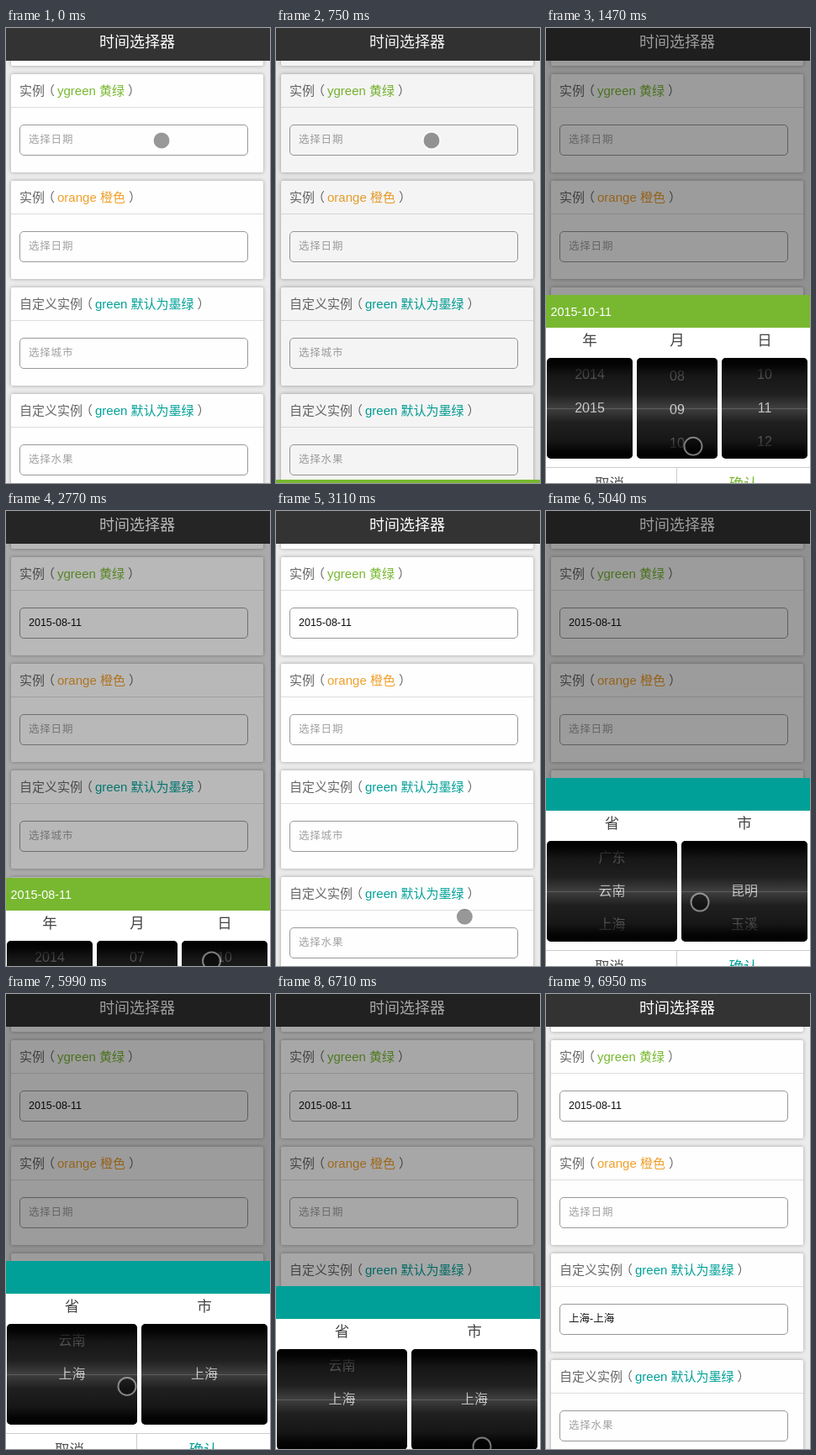
Animation, 314 px wide and 542 px high, one loop 7.55 s. Source, as an HTML page:

```html
<!DOCTYPE html>
<html lang="zh-CN">
<head>
<meta charset="utf-8">
<title>时间选择器</title>
<style>
* { box-sizing: border-box; }
html, body { margin: 0; width: 100%; height: 100%; overflow: hidden; }
body { font-family: "Liberation Sans", "Noto Sans CJK SC", "Noto Sans CJK", sans-serif; }
#stage { position: relative; width: 314px; height: 542px; overflow: hidden; background: #ebebeb; white-space: nowrap; }
#stage * { position: absolute; }
#stage span { position: relative; }
header { left: 0; top: 0; width: 314px; height: 39px; background: #333; color: #fff; font-size: 18px; line-height: 34px; text-align: center; padding-right: 2px; }
.card { left: 6px; width: 300px; height: 117px; background: #fefefe; border-radius: 2px; box-shadow: 0 0 4px rgba(0,0,0,.32); }
.card h2 { left: 0; top: 0; width: 100%; height: 40px; margin: 0; padding-left: 10px; border-bottom: 1px solid #ddd; font: inherit; font-size: 15px; line-height: 40px; color: #666; }
.card .open { left: -3px; }
.card .close { left: 4px; }
.field { left: 10px; top: 60px; width: 272px; height: 37px; padding-left: 10px; border: 1px solid #999; border-radius: 5px; font-size: 12.5px; line-height: 35px; color: #111; }
.field.hint { letter-spacing: .8px; color: #a2a2a2; }
#shade { inset: 0; background: #000; }
.panel { left: 0; top: 0; width: 314px; height: 244px; background: #fff; }
.bar { left: 0; top: 0; width: 100%; height: 39px; padding-left: 5.5px; background: var(--tint); color: #fff; font-size: 14.4px; line-height: 40px; }
.label { top: 36px; height: 36px; font-size: 17.5px; line-height: 36px; text-align: center; color: #444; }
.wheel { top: 75px; height: 120px; overflow: hidden; border-radius: 5px; background: #484848; }
.wheel .item { left: 0; top: 39.5px; width: 100%; height: 40px; font-size: 16px; line-height: 40px; text-align: center; color: #f8f8f8; }
.wheel .glass { inset: 0; background: linear-gradient(#000, rgba(0,0,0,.94) 7%, rgba(0,0,0,.69) 18%, rgba(0,0,0,.56) 36%, rgba(0,0,0,.12) 50%, rgba(0,0,0,.56) 64%, rgba(0,0,0,.69) 82%, rgba(0,0,0,.94) 93%, #000); }
.wheel .line { left: 0; top: 60px; width: 100%; height: 1px; background: rgba(255,255,255,.16); }
.button { top: 205px; height: 39px; border-top: 1px solid #ccc; font-size: 17.5px; line-height: 38px; text-align: center; color: #555; }
.cancel { left: 0; width: 156px; padding-right: 4px; border-right: 1px solid #ccc; }
.confirm { left: 156px; width: 158px; color: var(--tint); }
#touch { left: -11.5px; top: -11.5px; width: 23px; height: 23px; border-radius: 50%; border: 2px solid rgba(255,255,255,.45); background: rgba(0,0,0,.4); background-clip: padding-box; }
</style>
</head>
<body>
<div id="stage"></div>
<script>
const LOOP = 7550, STEP = 119, PHASE = 746;
const SLIDE = 255, HEIGHT = 244, BOTTOM = 562, ROW = 40;
const GREEN = '#78b830', ORANGE = '#f0a02c', TEAL = '#00a098';
const stage = document.getElementById('stage');

function add(parent, cls, text = '', tag = 'div') {
  const el = document.createElement(tag);
  el.className = cls;
  el.textContent = text;
  return parent.appendChild(el);
}

function addCard(i, title, name, color, hint) {
  const card = add(stage, 'card');
  card.style.top = 127 * i - 72 + 'px';
  const head = add(card, '', title, 'h2');
  add(head, 'open', '（', 'span');
  add(head, '', name, 'span').style.color = color;
  add(head, 'close', '）', 'span');
  return { el: add(card, 'field'), hint };
}

function addPanel(tint, columns) {
  const el = add(stage, 'panel');
  el.style.setProperty('--tint', tint);
  const bar = add(el, 'bar');
  const wheels = columns.map(([label, left, width, items]) => {
    const head = add(el, 'label', label), wheel = add(el, 'wheel');
    for (const box of [head, wheel]) {
      box.style.left = left + 'px';
      box.style.width = width + 'px';
    }
    const rows = items.map(text => add(wheel, 'item', text));
    add(wheel, 'glass');
    add(wheel, 'line');
    return rows;
  });
  add(el, 'button cancel', '取消');
  add(el, 'button confirm', '确认');
  return { el, bar, wheels };
}

const range = (a, b) => Array.from({ length: b - a + 1 }, (_, i) => String(a + i).padStart(2, '0'));

const fields = [
  ['实例', 'green 墨绿', TEAL, '选择日期'],
  ['实例', 'ygreen 黄绿', GREEN, '选择日期'],
  ['实例', 'orange 橙色', ORANGE, '选择日期'],
  ['自定义实例', 'green 默认为墨绿', TEAL, '选择城市'],
  ['自定义实例', 'green 默认为墨绿', TEAL, '选择水果']
].map((card, i) => addCard(i, ...card));
add(stage, '', '时间选择器', 'header');
const shade = add(stage, '');
shade.id = 'shade';
const datePanel = addPanel(GREEN, [
  ['年', 1, 102, range(2010, 2015)],
  ['月', 108, 96, range(1, 12)],
  ['日', 209, 102, range(1, 31)]
]);
const cities = ['昆明', '玉溪', '丽江'];
const cityPanel = addPanel(TEAL, [
  ['省', 1, 155, ['广东', '云南', '上海']],
  ['市', 161, 150, cities]
]);
const touch = add(stage, '');
touch.id = 'touch';

const dateTimes = { open: 720, close: 2696 };
const cityTimes = { open: 3820, close: 6666 };
const monthDrag = [1340, 1567], cityDrag = [4690, 5030], provinceDrag = [5510, 5750];
const dateField = [184.5, 133.5], cityField = [184.5, 379.5], confirm = [244, 535.5];

// Each move: time span, then where the finger ends up
const moves = [
  [[750, 1320], [174.5, 455.5]],
  [monthDrag, [174.5, 535.5]],
  [[1590, 2070], confirm],
  [[2770, 3470], cityField],
  [[3970, 4440], [182.5, 425.5]],
  [cityDrag, [182.5, 465.5]],
  [[5040, 5390], [49, 490]],
  [provinceDrag, [49, 400]],
  [[5750, 6230], [244.5, 538.5]],
  [[6710, 6930], [244.5, 560]]
];

const progress = (t, [from, to]) => Math.min(1, Math.max(0, (t - from) / (to - from)));

// cubic-bezier(.25, .1, .25, 1)
function ease(x) {
  let lo = 0, hi = 1;
  for (let i = 0; i < 20; i++) {
    const s = (lo + hi) / 2;
    if (.75 * s * (1 - s) + s ** 3 < x) lo = s; else hi = s;
  }
  return .3 * lo * (1 - lo) ** 2 + 3 * lo * lo * (1 - lo) + lo ** 3;
}

// Places the panel and returns how far the shade has faded in
function slide(panel, t, { open, close }) {
  const a = progress(t, [open, open + SLIDE]), b = progress(t, [close, close + SLIDE]);
  const y = Math.round(BOTTOM - HEIGHT * (ease(a) - ease(b)));
  panel.el.style.transform = `translateY(${y}px)`;
  return a - b;
}

function spin(rows, pos) {
  rows.forEach((row, i) => row.style.transform = `translateY(${(i - pos) * ROW}px)`);
}

function fill({ el, hint }, value) {
  el.className = value ? 'field' : 'field hint';
  el.textContent = value || hint;
}

function draw(t) {
  shade.style.opacity = .39 * (slide(datePanel, t, dateTimes) + slide(cityPanel, t, cityTimes));

  const month = 9 - 2 * progress(t, monthDrag);
  const date = `2015-${month > 7 ? 10 : '08'}-11`;
  datePanel.bar.textContent = date;
  [5, month, 10].forEach((pos, i) => spin(datePanel.wheels[i], pos));

  const settled = t > provinceDrag[1];
  spin(cityPanel.wheels[0], 1 + progress(t, provinceDrag));
  spin(cityPanel.wheels[1], 1 - progress(t, cityDrag));
  cityPanel.wheels[1].forEach((row, i) => row.textContent = settled ? ['上海'][i] || '' : cities[i]);

  const values = { 1: t > dateTimes.close && date, 3: t > cityTimes.close && '上海-上海' };
  fields.forEach((field, i) => fill(field, values[i]));

  const [x, y] = moves.reduce((at, [span, to]) => {
    const k = progress(t, span);
    return at.map((v, i) => v + (to[i] - v) * k);
  }, dateField);
  touch.style.transform = `translate(${x}px, ${y}px)`;
}

const start = performance.now();
let last;
function frame() {
  const now = (performance.now() - start) % LOOP;
  const tick = PHASE + Math.floor((now - PHASE) / STEP) * STEP;
  if (tick !== last) draw(last = tick);
  requestAnimationFrame(frame);
}
frame();
</script>
</body>
</html>
```
